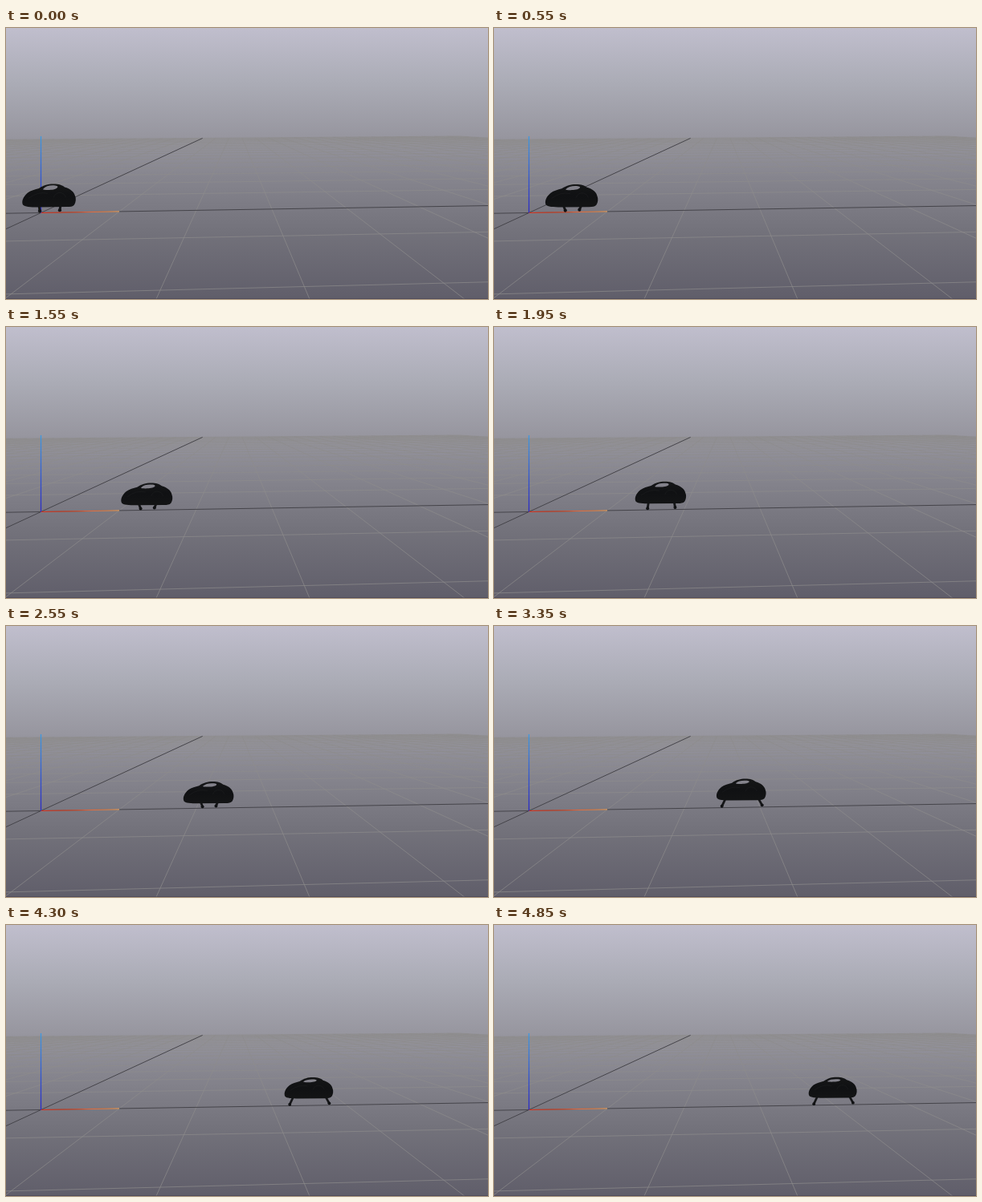
An HTML page with a canvas for the animation above (5100 ms loop, 600 by 338 pixels).

```html
<!DOCTYPE html>
<html>
<head>
<meta charset="utf-8">
<style>
html, body { margin: 0; width: 100%; height: 100%; overflow: hidden; background: #86858e; }
canvas { display: block; width: 600px; height: 338px; }
</style>
</head>
<body>
<canvas id="stage" width="600" height="338"></canvas>
<script>
const W = 600, H = 338, LOOP = 5100, STEP = 50, LAST = 4850, STRIDE = 500;
const ctx = document.getElementById('stage').getContext('2d');

// Floor plane to screen, from the origin and two vanishing points.
const O = [43.5, 230.5], VX = [10978, 55], VY = [286, 118.3];
const A = 0.009, B = 0.243, HALF = 20;
function floor(x, y) {
  const w = 1 + A * x + B * y;
  return [0, 1].map(i => (O[i] + A * x * VX[i] + B * y * VY[i]) / w);
}

function line(g, p, q, color, width = 1) {
  g.strokeStyle = color;
  g.lineWidth = width;
  g.beginPath();
  g.moveTo(...p);
  g.lineTo(...q);
  g.stroke();
}

function ramp(g, p, q, colors) {
  const r = g.createLinearGradient(...p, ...q);
  colors.forEach(([at, c]) => r.addColorStop(at, c));
  return r;
}

function drawScene() {
  const c = document.createElement('canvas');
  c.width = W;
  c.height = H;
  const g = c.getContext('2d');
  g.fillStyle = ramp(g, [0, 0], [0, H], [
    [0, '#c0becd'], [0.2, '#abacb6'], [0.4, '#97969f'],
    [0.55, '#86858e'], [0.75, '#73727b'], [1, '#605e6a']
  ]);
  g.fillRect(0, 0, W, H);

  const grid = 'rgba(141,140,140,0.7)';
  for (let n = -HALF; n <= HALF; n++) {
    if (n) line(g, floor(n, HALF), floor(n, -3), grid);
    if (n && n >= -2) line(g, floor(-HALF, n), floor(HALF, n), grid);
  }
  line(g, floor(-HALF, 0), floor(HALF, 0), '#45444a');
  line(g, floor(0, HALF), floor(0, -3), '#45444a');

  const end = floor(1, 0), top = [43.5, 135];
  line(g, O, end, ramp(g, O, end, [[0, '#e0301c'], [0.5, '#d8532f'], [1, '#e6a468']]), 1.2);
  line(g, O, top, ramp(g, O, top, [[0, '#2a28c4'], [0.4, '#3050d0'], [1, '#3f9ae0']]), 1.3);
  g.fillStyle = 'rgba(70,66,82,0.6)';
  g.fillRect(0, H - 1, W, 1);
  return c;
}
const scene = drawScene();

const shell = new Path2D(
  'M1 26C-1 22 1 16 7 11C11 8 16 7 21 5.5C27 1.5 32 0 39 0C46 0 50 1.5 53 4' +
  'C60 6 65 10 66 15C67.5 18 67 23 65 26C63 28.5 60 28.5 56 28.7L20 29C10 29 3 28.5 1 26Z');

function bodyPath(thin) {
  const p = new Path2D(shell);
  const hole = new Path2D('M26 2C29 -1.5 33 -2.6 38 -2.6C43 -2.6 45 -1.6 44 0C42 2.4 37 3 32 3C28 3 26 2.8 26 2Z');
  p.addPath(hole, new DOMMatrix([1, 0, 0, thin, 0, 4.5]));
  return p;
}

// Bounding gait: legs spread and tuck once per stride, the body surges and bobs.
function pose(t) {
  const wave = peak => Math.cos(2 * Math.PI * (t - peak) / STRIDE);
  const p = t / LAST;
  const s = 1 - 0.1 * Math.pow(p, 0.8);
  const x = 20 + 0.0765 * t + (1.5 + 5.5 * wave(3490)) * Math.min(1, t / 1900);
  const ground = 231.2 - 0.0158 * (x + 33 * s);
  return {
    x, s, p,
    y: ground - 36 * s - 0.9 - 1.6 * wave(3325),
    hip: 16.8 + 5.8 * wave(3325),
    foot: 18 + 9.5 * wave(3325)
  };
}

function drawRobot(t) {
  const { x, y, s, p, hip, foot } = pose(t);
  const mid = x + 34.5 * s;
  ctx.lineCap = 'round';
  ctx.fillStyle = '#111214';
  for (const side of [-1, 1]) {
    const fx = mid + side * foot * s;
    const fy = 228.9 - 0.0145 * fx - (side > 0 ? 0.7 : 0);
    line(ctx, [mid + side * hip * s, y + 27 * s], [fx, fy], '#151618', 3 * s);
    ctx.beginPath();
    ctx.arc(fx, fy, 2.1 * s, 0, 7);
    ctx.fill();
  }
  ctx.lineCap = 'butt';

  ctx.save();
  ctx.translate(x, y);
  ctx.scale(s, s);
  ctx.fillStyle = ramp(ctx, [0, 0], [0, 29], [[0, '#151617'], [0.5, '#101113'], [1, '#131415']]);
  ctx.fill(bodyPath(1 - 0.3 * p), 'evenodd');
  ctx.strokeStyle = '#1b1c1e';
  ctx.lineWidth = 0.8;
  ctx.beginPath();
  ctx.arc(47, 19, 8, 3.4, 6);
  ctx.moveTo(8, 18);
  ctx.quadraticCurveTo(20, 9, 32, 12);
  ctx.stroke();
  ctx.restore();
}

function draw(now) {
  const t = Math.min(LAST, Math.floor((now % LOOP) / STEP) * STEP);
  ctx.drawImage(scene, 0, 0);
  drawRobot(t);
}

const start = performance.now();
function tick() {
  draw(performance.now() - start);
  requestAnimationFrame(tick);
}
tick();
</script>
</body>
</html>
```
